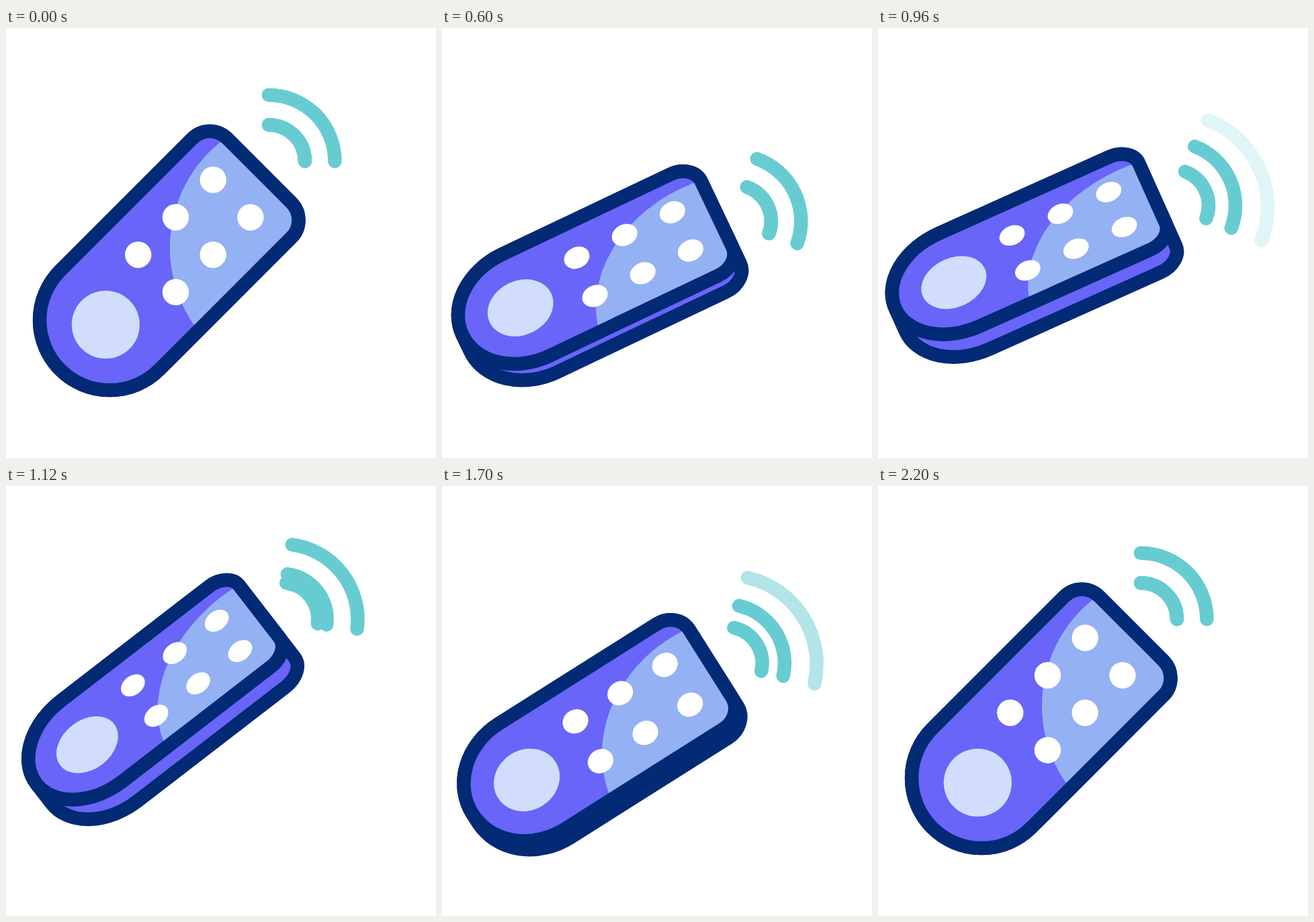
These frames come from a looping animation (640x640 px, 2400 ms). An HTML page:

```html
<!DOCTYPE html>
<html lang="en">
<head>
<meta charset="utf-8">
<title>Remote control</title>
<style>
  html, body { margin: 0; width: 100%; height: 100%; overflow: hidden; background: #fff; }
  svg { display: block; width: 100%; height: 100%; }
  .outline { stroke: #032a75; stroke-width: 20.5; stroke-linejoin: round; }
  .case { fill: #6865f8; }
  .shine { fill: #94b1f3; }
  .dial { fill: #d2dcfd; }
  .keys { fill: #fff; }
  .waves { fill: none; stroke: #67ccd1; stroke-width: 20.5; stroke-linecap: round; }
</style>
</head>
<body>
<svg viewBox="0 0 640 640">
  <defs><clipPath id="faceClip"><path id="clipShape"/></clipPath></defs>
  <g id="remote">
    <path id="back" class="case outline"/>
    <path id="front" class="case"/>
    <g clip-path="url(#faceClip)">
      <g class="squash"><circle class="shine" cx="177.2" cy="130.3" r="202.5"/></g>
    </g>
    <path id="rim" class="outline" fill="none"/>
    <g class="squash">
      <circle class="dial" cx="-114.5" cy="0.5" r="50.6"/>
      <g id="keys" class="keys"></g>
    </g>
    <g class="waves">
      <path id="inner"/>
      <path id="middle"/>
      <path id="outer"/>
    </g>
  </g>
</svg>
<script>
const LOOP = 2400, STEP = 20;
const CENTER = { x: 229, y: 360.2 };

// Case outline in its own frame: x runs along the remote, y across it.
const HALF = 104.25, END_X = -105.6, TIP_X = 209.35, CORNER = 36.75;
const SQUASH = 0.2765, DEPTH = 37;
const WAVE = { x: 229, near: 54, far: 98.5, period: 400, start: 200, end: 1800 };

// Each track lists [time, value]; values ease between neighbours.
const TRACKS = {
  angle: [[220, -45], [800, -18], [1430, -56.4], [1800, -27], [2200, -45]],
  lift: [[220, 0], [680, 28], [1195, -25.5], [1740, 26.5], [2200, 0]],
  tilt: [[220, 0], [800, 1], [1430, 1], [1910, 0]]
};

const $ = id => document.getElementById(id);
const set = (id, name, value) => $(id).setAttribute(name, value);

function sample(track, t) {
  if (t <= track[0][0]) return track[0][1];
  for (let i = 1; i < track.length; i++) {
    const [t0, a] = track[i - 1], [t1, b] = track[i];
    if (t < t1) {
      const s = (t - t0) / (t1 - t0);
      return a + (b - a) * s * s * (3 - 2 * s);
    }
  }
  return track[track.length - 1][1];
}

function casePath(k, depth) {
  const top = -HALF, bottom = top + 2 * HALF * k + depth;
  const ry = HALF * k, cy = CORNER * k, cx = TIP_X - CORNER;
  const end = `A${HALF} ${ry} 0 0 1 `, corner = `A${CORNER} ${cy} 0 0 1 `;
  return `M${END_X} ${top}H${cx}${corner}${TIP_X} ${top + cy}V${bottom - cy}` +
    `${corner}${cx} ${bottom}H${END_X}${end}${END_X - HALF} ${bottom - ry}` +
    `V${top + ry}${end}${END_X} ${top}Z`;
}

// Quarter circle facing along the remote.
function arcPath(x, y, r) {
  const c = r * Math.SQRT1_2;
  return `M${x + c} ${y - c}A${r} ${r} 0 0 1 ${x + c} ${y + c}`;
}

function drawWaves(t) {
  const active = t >= WAVE.start && t < WAVE.end;
  const p = active ? (t - WAVE.start) % WAVE.period / WAVE.period : 0;
  const grow = (WAVE.far - WAVE.near) * p;
  set("inner", "d", arcPath(WAVE.x, 0, WAVE.near));
  set("middle", "d", arcPath(WAVE.x, 0, WAVE.near + grow));
  set("outer", "d", arcPath(WAVE.x + 2.5 * p, 4 * p, WAVE.far + grow));
  set("outer", "opacity", Math.min(1, 2 * (1 - p)));
}

function draw(t) {
  const tilt = sample(TRACKS.tilt, t), k = 1 - SQUASH * tilt;
  const y = CENTER.y + sample(TRACKS.lift, t);
  set("remote", "transform", `translate(${CENTER.x} ${y}) rotate(${sample(TRACKS.angle, t)})`);

  const face = casePath(k, 0);
  for (const id of ["front", "clipShape", "rim"]) set(id, "d", face);
  set("back", "d", casePath(k, DEPTH * tilt));
  for (const g of document.querySelectorAll(".squash")) {
    g.setAttribute("transform", `translate(0 ${-HALF * (1 - k)}) scale(1 ${k})`);
  }
  drawWaves(t);
}

for (const row of [-1, 1]) {
  for (const col of [-1, 0, 1]) {
    const key = document.createElementNS("http://www.w3.org/2000/svg", "circle");
    key.setAttribute("cx", 72.1 + 78.8 * col);
    key.setAttribute("cy", 0.5 + 39.4 * row);
    key.setAttribute("r", 19.7);
    $("keys").append(key);
  }
}

const began = performance.now();
function tick() {
  const t = (performance.now() - began) % LOOP;
  draw(Math.floor(t / STEP) * STEP);
  requestAnimationFrame(tick);
}
tick();
</script>
</body>
</html>
```
